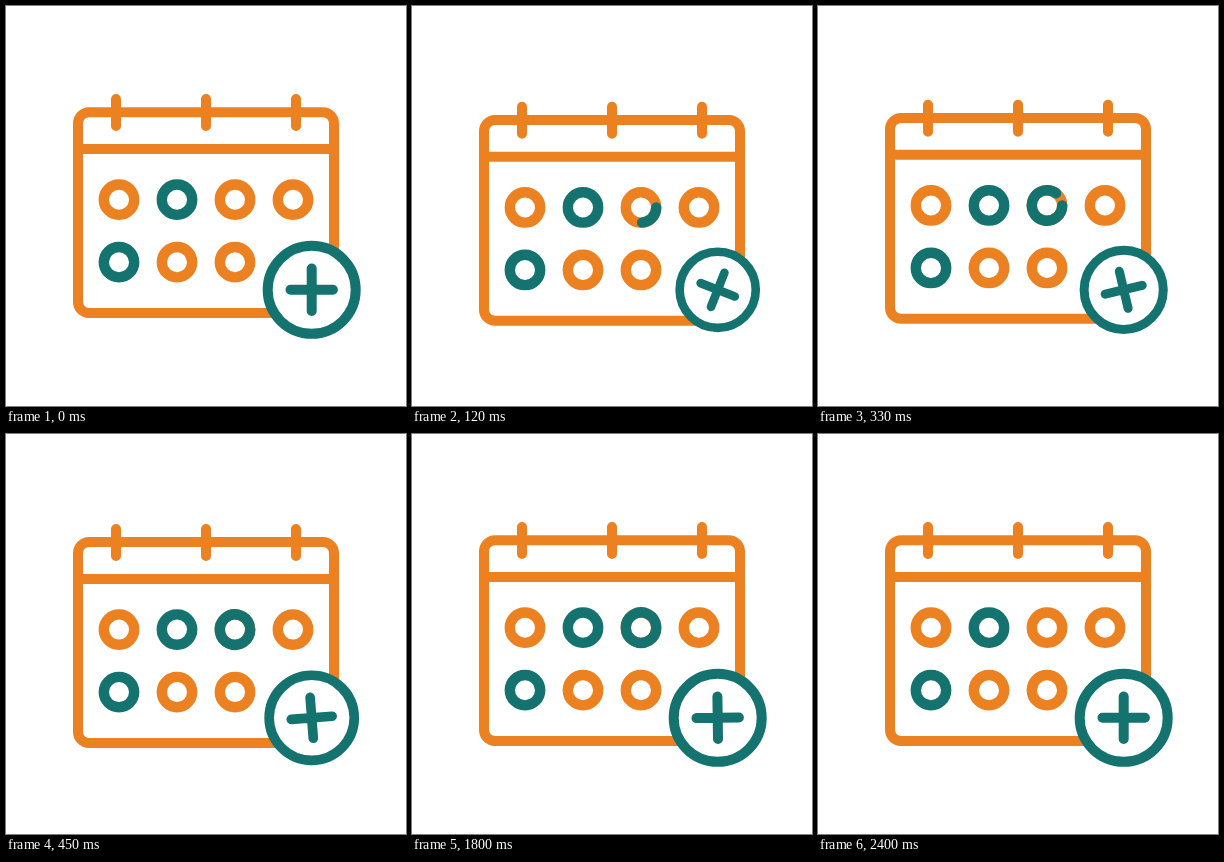
Animation, 400 px wide and 400 px high, one loop 2.93 s. Source, as an HTML page:

```html
<!DOCTYPE html>
<html lang="en">
<head>
<meta charset="utf-8">
<title>Calendar</title>
<style>
  html, body { margin: 0; width: 100%; height: 100%; overflow: hidden; background: #fff; }
  svg { display: block; width: 100vw; height: 100vh; }
  .orange { stroke: #ec8122; }
  .teal { stroke: #14736f; }
</style>
</head>
<body>
<svg viewBox="0 0 400 400" fill="none" stroke-width="10" stroke-linecap="round">
  <g id="calendar">
    <g class="orange">
      <rect x="72" y="106.2" width="256" height="200.8" rx="11"/>
      <path d="M72 143H328"/>
      <path d="M110 93V120M200 93V120M290 93V120"/>
    </g>
    <g id="days"></g>
    <path id="mark" class="teal" stroke-width="10.4"/>
  </g>
  <g id="badge">
    <circle class="teal" r="44" fill="#fff"/>
    <path id="plus" class="teal" d="M-21.2 0H21.2M0 -21.2V21.2"/>
  </g>
</svg>
<script>
const LOOP = 2930, STEP = 30;
const RING = 15.2, COLS = [113, 171, 229, 287], ROWS = [193.7, 256.2];
const $ = id => document.getElementById(id);

// CSS-style cubic-bezier, solved by bisection
function bezier(x1, y1, x2, y2) {
  const at = (s, a, b) => 3 * s * (1 - s) * ((1 - s) * a + s * b) + s ** 3;
  return x => {
    if (x <= 0) return 0;
    if (x >= 1) return 1;
    let lo = 0, hi = 1;
    for (let i = 0; i < 30; i++) {
      const mid = (lo + hi) / 2;
      if (at(mid, x1, x2) < x) lo = mid; else hi = mid;
    }
    return at(lo, y1, y2);
  };
}
const ease = bezier(0.25, 0.1, 0.25, 1);
const swing = bezier(0.31, 0, 0.06, 1);
const part = (t, from, to) => (t - from) / (to - from);

function addDay(col, row, color) {
  const c = document.createElementNS('http://www.w3.org/2000/svg', 'circle');
  c.setAttribute('cx', COLS[col]);
  c.setAttribute('cy', ROWS[row]);
  c.setAttribute('r', RING);
  c.setAttribute('stroke-width', 10.4);
  c.setAttribute('class', color);
  $('days').append(c);
}
for (let row = 0; row < 2; row++)
  for (let col = 0; col < 4 - row; col++)
    addDay(col, row, col + row === 1 && col < 2 ? 'teal' : 'orange');

// Clockwise arc from the right-hand side of the third day
function arc(turn) {
  const sweep = Math.min(turn, 0.9999) * 2 * Math.PI;
  if (sweep < 0.035) return '';
  const cx = COLS[2], cy = ROWS[0];
  const x = cx + RING * Math.cos(sweep), y = cy + RING * Math.sin(sweep);
  return `M${cx + RING} ${cy}A${RING} ${RING} 0 ${+(sweep > Math.PI)} 1 ${x} ${y}`;
}

function draw(t) {
  const press = ease(part(t, 0, 220)) - ease(part(t, 220, 690));
  const turn = swing(part(t, 0, 660));
  const spin = turn - swing(part(t, 1770, 2400));
  const fill = turn - swing(part(t, 1770, 2370));
  $('calendar').setAttribute('transform', `translate(0 ${9.2 * press})`);
  $('badge').setAttribute('transform', `translate(305.7 283.8) scale(${1 - 0.16 * press})`);
  $('plus').setAttribute('transform', `rotate(${90 * spin})`);
  $('mark').setAttribute('d', arc(fill));
}

const start = performance.now();
function tick() {
  const t = (performance.now() - start) % LOOP;
  draw(Math.floor(t / STEP) * STEP);
  requestAnimationFrame(tick);
}
tick();
</script>
</body>
</html>
```
